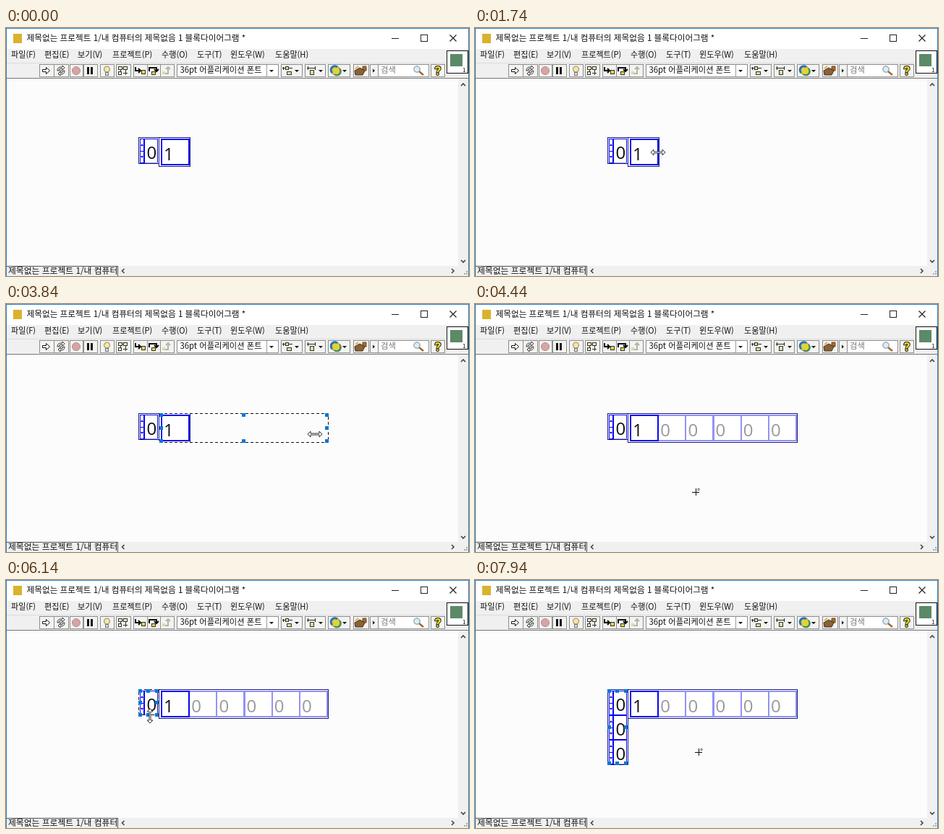
An HTML page for the animation above (8000 ms loop, 640 px wide and 343 px high).

```html
<!DOCTYPE html>
<html lang="ko">
<head>
<meta charset="utf-8">
<title>블록다이어그램</title>
<style>
html, body { margin: 0; width: 100%; height: 100%; overflow: hidden; background: #fcfcfc; }
svg { display: block; width: 100%; height: 100%; }
text { font: 11px "Noto Sans CJK KR", "Noto Sans CJK", sans-serif; fill: #111; white-space: pre; }
.digit { font: 24px "Open Sans", "Noto Sans", sans-serif; }
.help { font: bold 16px Inter, sans-serif; fill: #f4e21c; stroke: #222; stroke-width: 2px; paint-order: stroke; }
</style>
</head>
<body>
<svg viewBox="0 0 640 343" shape-rendering="crispEdges">
  <g id="chrome"></g>
  <g id="scene"></g>
</svg>
<script>
const LOOP = 8000, PITCH_X = 38.2, PITCH_Y = 34;
const BLUE = '#0606f2', LILAC = '#9292f6', INK = '#1a1a78', HANDLE = '#0878d4';

const rect = (x, y, w, h, fill, stroke = 'none', sw = 1, more = '') =>
  `<rect x="${x}" y="${y}" width="${w}" height="${h}" fill="${fill}" stroke="${stroke}" stroke-width="${sw}" ${more}/>`;
const path = (d, stroke, sw = 1, fill = 'none') =>
  `<path d="${d}" fill="${fill}" stroke="${stroke}" stroke-width="${sw}"/>`;
const smooth = (d, stroke, sw = 1, fill = 'none') =>
  `<path d="${d}" fill="${fill}" stroke="${stroke}" stroke-width="${sw}" shape-rendering="auto"/>`;
const disc = (x, y, r, fill, stroke = 'none') =>
  `<circle cx="${x}" cy="${y}" r="${r}" fill="${fill}" stroke="${stroke}" shape-rendering="auto"/>`;
const label = (x, y, s, size = 11, fill = '#111') =>
  `<text x="${x}" y="${y}" style="font-size:${size}px;fill:${fill}">${s}</text>`;
const digit = (x, y, s, fill = '#111') =>
  `<text class="digit" x="${x}" y="${y}" style="fill:${fill}">${s}</text>`;
const dropMark = (x, y) => smooth(`M${x - 3} ${y}h6l-3 3z`, 'none', 0, '#111');

function titleBar() {
  return rect(0, 0, 640, 30, '#fff') + rect(10, 8, 12, 13, '#d9b32c') +
    label(28.5, 18, '제목없는 프로젝트 1/내 컴퓨터의 제목없음 1 블록다이어그램 *', 11.65) +
    path('M533 14.5h10', '#222') + rect(573.5, 9.5, 9, 9, 'none', '#222') +
    smooth('M613.500 9.500l9 9m0 -9l-9 9', '#222', 1.2);
}

function menuBar() {
  const items = [[7, '파일(F)'], [53, '편집(E)'], [99, '보기(V)'], [147, '프로젝트(P)'],
    [215, '수행(O)'], [264, '도구(T)'], [310, '윈도우(W)'], [372, '도움말(H)']];
  return rect(0, 29, 640, 41, '#f0f0f0') + items.map(([x, s]) => label(x, 41, s, 11.1)).join('');
}

function toolbar() {
  const buttons = [[46, 20], [66, 20], [88, 18], [107, 19], [130, 19], [152, 20], [176, 19], [195, 18],
    [213, 19], [236, 140], [380, 29], [413, 28], [445, 30], [480, 21], [503, 11], [514, 70], [587, 19]];
  const frames = buttons.map(([x, w]) =>
    rect(x + .5, 50.5, w, 17, w > 60 ? '#fff' : '#f3f3f1', '#8c8c8c')).join('');
  const step = (d, tint, ink) => smooth(d, ink, 2) + tint;
  return path('M0 48.5H608', '#dcdcdc') + frames +
    smooth('M50.5 57.5h5v-3l5 4.5l-5 4.5v-3h-5z', '#111', 1, '#fff') +
    smooth('M71 59q0 -5 5 -5h2v-2l3 3l-3 3v-2h-2q-3 0 -3 3zM81 59q0 5 -5 5h-1v2l-3 -3l3 -3v2h1q3 0 3 -3zM74 59h4', '#222', .9, '#fff') +
    disc(97, 59, 5.5, '#d6a4a4', '#b68b8b') +
    rect(112, 54, 3, 10, '#111') + rect(117, 54, 3, 10, '#111') +
    disc(139.5, 57, 4, '#f5e7a5', '#8f8563') + rect(137.5, 61.5, 4, 4, '#ddd', '#777') +
    rect(155.5, 53.5, 5, 4, '#f3ecc4', '#333') + rect(162.5, 53.5, 5, 4, '#f3ecc4', '#333') +
    rect(155.5, 60.5, 4, 4, '#f3ecc4', '#333') + path('M158 58v3M160 55.500h3M162 62.500h6M165 58v7', '#333') +
    step('M179 54v5h6m-2 -3l3 3l-3 3', rect(187.5, 58.5, 5, 5, '#eed447', '#333'), '#111') +
    step('M198 60v-5h10v4m-3 -2l3 3l3 -3', rect(201.5, 60.5, 5, 4, '#eed447', '#333'), '#111') +
    step('M218 63h6v-8m-3 2l3 -3l3 3', rect(216, 60, 4, 4, '#ddd8ae'), '#b5b5a8') +
    label(240.5, 62, '36pt 어플리케이션 폰트', 11.3) + path('M360.5 51v16', '#999') + dropMark(367, 58) +
    path('M383.500 54v4M382 55.500h14', '#222') + rect(386.5, 53.5, 4, 4, '#e8dc9c', '#333') +
    rect(388.5, 60.5, 6, 4, '#e8dc9c', '#333') + dropMark(402, 58) +
    path('M416 55.5h12M417.5 53v5M427.5 53v5', '#222') + rect(420.5, 58.5, 5, 6, '#e8dc9c', '#333') + dropMark(435, 58) +
    disc(456, 59, 6, '#e2d23a', '#6c762c') +
    smooth('M451 62a5 5 0 0 1 7 -8', '#2d72b9', 3) + smooth('M461 56a5 5 0 0 1 -7 8', '#3c8a5c', 2) + dropMark(468, 58) +
    smooth('M493 53h5v6h-5z', '#6f4a20', 1, '#a8692d') + smooth('M482 59l7 -4l7 4l-3 6h-10z', '#44331c', 1, '#8a6236') +
    smooth('M483 56l4 -3', '#d8b13c', 2) +
    smooth('M507 56.5l3 2.5l-3 2.5z', 'none', 0, '#111') +
    label(518, 62, '검색', 11.3, '#777') + smooth('M571 60l6 5', '#a06b32', 2.5) + disc(568, 57, 4.2, '#dcecf5', '#6e8797') +
    '<text class="help" x="592.5" y="65">?</text>' +
    path('M0 69.5H640', '#777') +
    rect(609.5, 31.5, 29, 31, '#fff', '#111') + rect(614, 36, 17, 17, '#5c8967') + label(631, 61, '1', 8);
}

function scrollBars() {
  const grip = [[637, 336], [637, 339], [634, 339]].map(([x, y]) => rect(x - 1, y, 2, 2, '#aaa')).join('');
  return rect(625, 70, 15, 259, '#f0f0f0') + rect(0, 329, 640, 14, '#f0f0f0') +
    smooth('M629 80l3 -3l3 3M629 321l3 3l3 -3M163.500 333l-3 3l3 3M616 333l3 3l-3 3', '#444', 1.6) +
    path('M1 329.5H154.5V343', '#555') + label(3, 340, '제목없는 프로젝트 1/내 컴퓨터', 11.8) + grip +
    path('M0 .5H639.5V343M.5 0V343', '#2b7fc4');
}

document.getElementById('chrome').innerHTML =
  rect(0, 0, 640, 343, '#fcfcfc') + titleBar() + menuBar() + toolbar() + scrollBars();

const cursors = {
  cross: smooth('M-5 .5h10M.5 -5v10', '#111') +
    '<circle cx="4" cy="-3.5" r="1.3" fill="none" stroke="#333" stroke-width=".8" shape-rendering="auto"/>',
  arrow: smooth('M.5 .5v10l2.5 -2l2 4l2 -1l-2 -4h3z', '#111', 1.1, '#fff'),
  wide: smooth('M-10 0l4 -4v3h12v-3l4 4l-4 4v-3h-12v3z', '#333', 1, '#fff'),
  tall: smooth('M0 -10l4 4h-3v12h3l-4 4l-4 -4h3v-12h-3z', '#333', 1, '#fff')
};

// time, x, y, cursor shown from that time on
const track = [
  [140, 619, 64, 'cross'], [340, 560, 92, 'cross'], [440, 512, 118, 'cross'], [640, 425, 166, 'cross'],
  [740, 395, 178, 'cross'], [840, 353, 168, 'cross'], [940, 254, 178, 'arrow'], [1040, 253, 181, 'wide'],
  [1140, 253, 186, 'wide'], [1240, 253, 186, 'wide'], [1340, 253, 172, 'wide'], [1740, 253, 172, 'wide'],
  [2540, 380, 180, 'wide'], [2840, 380, 180, 'wide'], [3240, 427, 180, 'wide'], [3840, 427, 180, 'wide'],
  [3940, 430, 190, 'cross'], [4140, 395, 240, 'cross'], [4240, 355, 262, 'cross'], [4340, 325, 264, 'cross'],
  [4540, 285, 256, 'cross'], [4840, 225, 233, 'cross'], [5040, 208, 205, 'cross'], [5140, 204, 187, 'arrow'],
  [5640, 199, 185, 'tall'], [5740, 198, 185, 'tall'], [6040, 198, 185, 'tall'], [6840, 202, 206, 'tall'],
  [7540, 203, 241, 'tall'], [7740, 203, 241, 'cross'], [7940, 309, 238, 'cross'], [8000, 309, 238, 'cross']
];

function cursorAt(t) {
  const i = track.findIndex(k => k[0] > t);
  if (i <= 0) return null;
  const [t0, x0, y0, kind] = track[i - 1], [t1, x1, y1] = track[i];
  // the pointer rests while it selects the index box
  const f = kind === 'arrow' ? 0 : (t - t0) / (t1 - t0);
  return { x: Math.round(x0 + (x1 - x0) * f), y: Math.round(y0 + (y1 - y0) * f), kind };
}

function handles(l, t, r, b) {
  const mx = (l + r) / 2, my = (t + b) / 2;
  return [[l, t], [mx, t], [r, t], [l, my], [r, my], [l, b], [mx, b], [r, b]]
    .map(([x, y]) => rect(Math.floor(x) - 2, Math.floor(y) - 2, 5, 5, HANDLE)).join('');
}

const outline = (l, t, r, b, dashed) =>
  rect(l + .5, t + .5, r - l, b - t, 'none', dashed ? '#111' : INK, 1, dashed ? 'stroke-dasharray="4 3"' : '');

function indexBox(rows, dashed, bottom) {
  const end = 187 + PITCH_Y * (rows - 1);
  let s = rect(184, 152, 27, end - 151, '#fff');
  for (let i = 0; i < rows; i++) {
    const y = 153 + i * PITCH_Y;
    s += rect(185.5, y + .5, 24, PITCH_Y - 1, '#fff', BLUE) + path(`M186 ${y + 17.5}h5`, BLUE) +
      smooth(`M186 ${y + 10}l2 -3l2 3zM186 ${y + 24}l2 3l2 -3z`, 'none', 0, BLUE) +
      digit(194.5, y + 28, '0');
  }
  s += path(`M191 153V${end}`, BLUE, 2) + path(`M192 ${end - .5}H210`, LILAC);
  return s + outline(183, 151, 211, bottom, dashed);
}

function arrayBox(count, dashed, right) {
  let s = rect(212, 152, 43 + (count - 1) * PITCH_X, 39, '#fff');
  const cell = (i, color) => rect(215 + Math.round(i * PITCH_X), 154, 38, 35, '#fff', color, 2);
  for (let i = count - 1; i > 0; i--)
    s += cell(i, LILAC) + digit(218 + i * PITCH_X, 183, '0', '#999');
  s += cell(0, BLUE) + digit(218, 183, '1');
  if (count === 1) s += path('M254.5 152V191', INK);
  return s + outline(211, 151, right, 191, dashed);
}

function scene(t) {
  const within = (a, b) => t >= a && t < b;
  const c = cursorAt(t);

  const stretchX = within(1840, 3940), stretchY = within(6140, 7640);
  const count = t >= 3940 ? 6 : 1, rows = t >= 7640 ? 3 : 1;
  const snapped = stretchX
    ? t < 2640 ? Math.min(2, Math.round((c.x - 254) / PITCH_X)) : Math.round((c.x - 254) / PITCH_X)
    : count - 1;
  const right = Math.round(254 + snapped * PITCH_X);
  const extra = stretchY ? Math.round((c.y - 187) / PITCH_Y) : rows - 1;
  const bottom = (stretchY ? 186 : 187) + extra * PITCH_Y;

  let s = arrayBox(count, stretchX, right) + indexBox(rows, stretchY || within(5240, 6040), bottom);
  if (within(940, 1740) || within(1840, 4140)) s += handles(214, 153, right - 2, 189);
  if (within(5240, 6040) || t >= 6140) s += handles(185, 153, 208, (stretchY ? 186 : 185) + extra * PITCH_Y);
  if (within(4040, 4140) || within(5240, 6040) || within(7840, 7940))
    s += path('M446 171.5h5', BLUE) + disc(447, 171.5, 2, BLUE);
  if (c) s += `<g transform="translate(${c.x} ${c.y})">${cursors[c.kind]}</g>`;
  return s;
}

const stage = document.getElementById('scene');
const start = performance.now();
let shown;
function draw() {
  const now = (performance.now() - start) % LOOP;
  const tick = Math.floor((now - 40) / 100) * 100 + 40;
  if (tick !== shown) stage.innerHTML = scene(shown = tick);
  requestAnimationFrame(draw);
}
draw();
</script>
</body>
</html>
```
